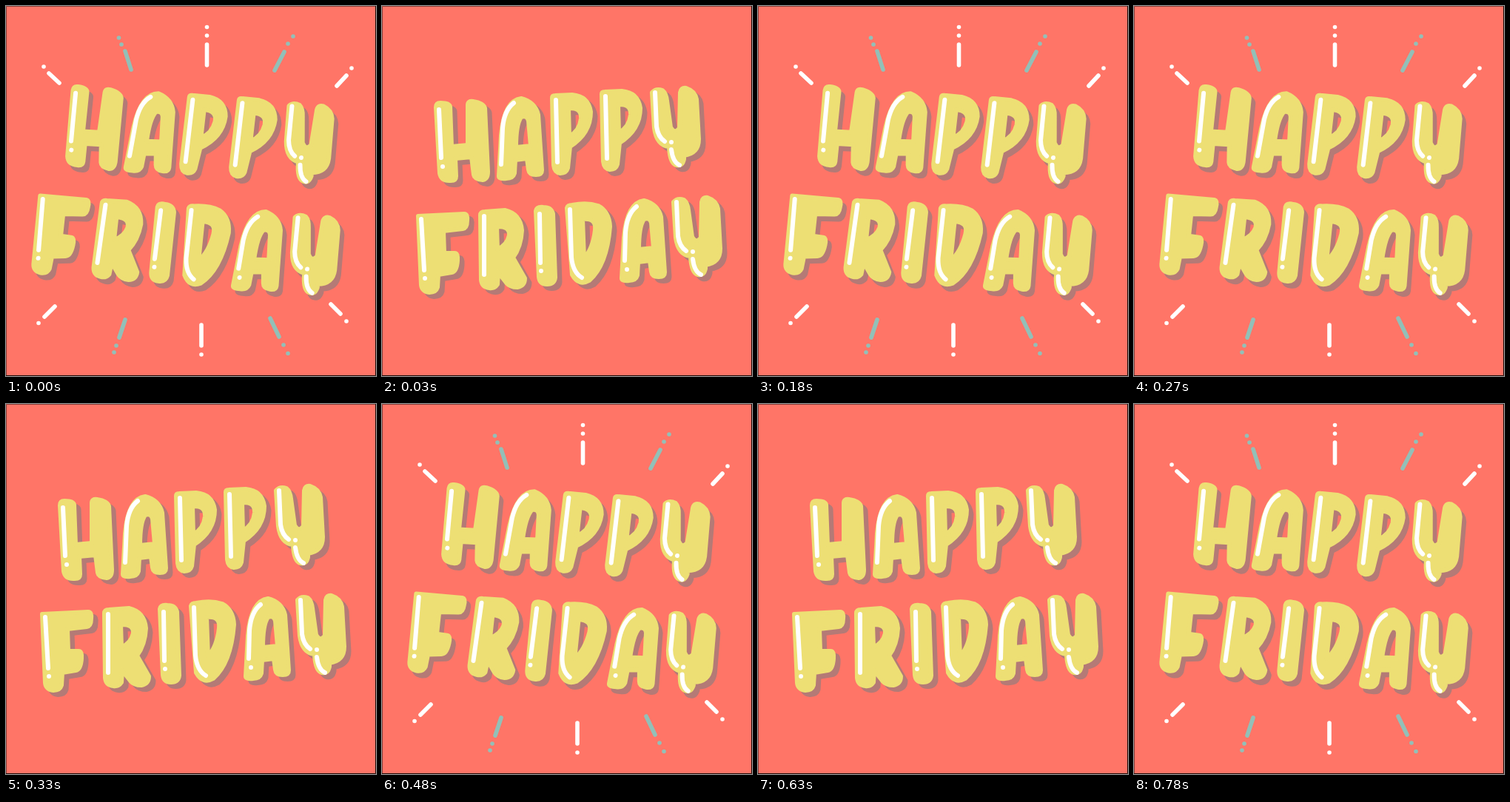
An HTML page that plays this animation: 500x500 px, repeating every 900 ms.

```html
<!DOCTYPE html>
<html lang="en">
<head>
<meta charset="utf-8">
<title>Happy Friday</title>
<style>
  html, body { margin: 0; width: 100%; height: 100%; overflow: hidden; background: #ff7567; }
  svg { display: block; width: 100vw; height: 100vh; }
  .face { fill: #eddf74; stroke: #eddf74; stroke-width: 6; }
  .shadow { fill: #b47a76; stroke: #b47a76; stroke-width: 6; }
  .face, .shadow { fill-rule: evenodd; stroke-linejoin: round; }
  .shine, .ray { fill: none; stroke: #fff; stroke-linecap: round; stroke-linejoin: round; }
  .shine { stroke-width: 6; }
  .ray { stroke-width: 5.6; }
  .teal { stroke: #92c0b8; }
  .edge { fill: none; }
</style>
</head>
<body>
<svg id="stage" viewBox="0 0 500 500" role="img" aria-label="Happy Friday">
  <rect width="500" height="500" fill="#ff7567"/>
  <g id="rays"></g>
  <g id="words"></g>
  <path class="edge" d="M.5 500V.5H500" stroke="#8a403a"/>
  <path class="edge" d="M0 499.5H499.5V0" stroke="#1c0d0b"/>
</svg>
<script>
const LOOP = 900, BEAT = 150, LEAD = 120;
const SHADOW = [6.5, 6];
const TILT = 'rotate(8 245 251)';

const glyphs = {
  H: 'M73 137Q73 131 79 131Q91 131 92 136L94 190L116 188L116 134Q116 128 123 129Q137 131 139 138L143 224Q143 234 136 235Q125 234 124 228L121 204L99 206L100 230Q100 236 93 236Q80 237 78 226Z',
  A: 'M158 230L161 175Q165 128 188 125Q207 130 211 147L216 222Q216 228 208 228Q199 228 198 221L196 206L180 208L179 226Q177 233 168 233Q158 234 158 230Z'
   + 'M188 150Q196 147 198 155L201 189L181 191Q181 160 188 150Z',
  P: 'M230 124Q230 121 234 121L257 120Q279 122 282 143Q282 172 254 190L251 219Q249 226 241 226Q233 225 232 215Z'
   + 'M252 138Q270 137 269 152Q267 169 253 176Z',
  Y: 'M365 117Q370 111 379 114Q384 118 385 128L390 164Q396 174 402 165L403 117Q404 110 411 111Q423 115 425 126L428 180Q428 199 408 202L408 207Q406 217 398 215Q389 213 388 190Q371 188 368 165Z',
  F: 'M49 284L111 281Q116 281 115 290Q115 300 109 301L83 304L84 334L98 334Q103 334 102 344Q101 359 94 360L76 363L75 380Q73 387 64 387Q54 386 53 377Z',
  R: 'M133 283Q133 278 139 278L166 276Q187 281 189 303Q188 325 177 340L193 368Q193 378 183 380Q173 380 168 374L157 360L156 376Q152 382 145 381Q135 380 134 370Z'
   + 'M155 298Q173 297 172 310Q169 323 156 329Z',
  I: 'M208 277Q209 271 218 272Q229 272 231 281L234 367Q233 376 223 376Q213 376 212 366Z',
  D: 'M250 273Q251 269 257 269Q277 265 292 270Q307 278 308 298Q304 350 280 371Q266 379 257 363Z'
   + 'M271 288Q290 286 288 303Q285 328 273 341Z'
};

// Zero-length segments become round dots.
const dot = (x, y) => `M${x} ${y}h.01`;
const pShine = 'M235 127L237 211';
const yShine = 'M369 117L371 163Q373 177 382 183' + dot(391, 184) + 'M391 194Q393 211 402 215';

// [glyph, dx, dy, highlight before the shift]
const letters = [
  ['H', 0, 0, 'M77 140L80 205' + dot(82, 217)],
  ['A', 0, 0, 'M178 131Q165 141 163 165L161 214'],
  ['P', 0, 0, pShine],
  ['P', 67, -5, pShine],
  ['Y', 0, 0, yShine],
  ['F', 0, 0, 'M53 288L57 357' + dot(58, 368)],
  ['R', 0, 0, 'M138 284L138 363'],
  ['I', 0, 0, 'M213 281L214 347' + dot(215, 358)],
  ['D', 0, 0, 'M254 275L256 340Q258 360 270 367'],
  ['A', 166, 138, 'M178 133Q165 143 163 168L162 206' + dot(165, 218)],
  ['Y', 29, 148, yShine]
];

// [dash, outer dots, teal?]
const rays = [
  ['M58 91L72 104', [[51, 82]]],
  ['M161 61L169 86', [[156, 52], [152.5, 43]], true],
  ['M271.5 52V80', [[271.5, 40], [271.5, 28.5]]],
  ['M376 62L363 87', [[381, 51], [388, 41]], true],
  ['M460 94L447 108', [[467, 84]]],
  ['M66 406L52 420', [[44, 428.5]]],
  ['M161 424L153 448', [[149, 459], [146, 468]], true],
  ['M264 431V459', [[264, 471]]],
  ['M357 422L369 447', [[375, 458], [381, 469.5]], true],
  ['M439 403L452 416', [[460, 426]]]
];

const byId = id => document.getElementById(id);
const words = byId('words'), rayGroup = byId('rays');

function addPath(parent, className, d, dx = 0, dy = 0) {
  const path = document.createElementNS('http://www.w3.org/2000/svg', 'path');
  path.setAttribute('class', className);
  path.setAttribute('d', d);
  path.setAttribute('transform', `translate(${dx} ${dy})`);
  parent.append(path);
}

for (const [name, dx, dy] of letters) {
  addPath(words, 'shadow', glyphs[name], dx + SHADOW[0], dy + SHADOW[1]);
}
for (const [name, dx, dy, shine] of letters) {
  addPath(words, 'face', glyphs[name], dx, dy);
  addPath(words, 'shine', shine, dx, dy);
}
for (const [dash, dots, teal] of rays) {
  addPath(rayGroup, teal ? 'ray teal' : 'ray', dash + dots.map(p => dot(...p)).join(''));
}

function render(time) {
  const shining = Math.floor((time % LOOP + LEAD) / BEAT) % 2 === 0;
  words.setAttribute('transform', shining ? TILT : '');
  rayGroup.setAttribute('visibility', shining ? 'visible' : 'hidden');
}

const start = performance.now();
function tick() {
  render(performance.now() - start);
  requestAnimationFrame(tick);
}
tick();
</script>
</body>
</html>
```
